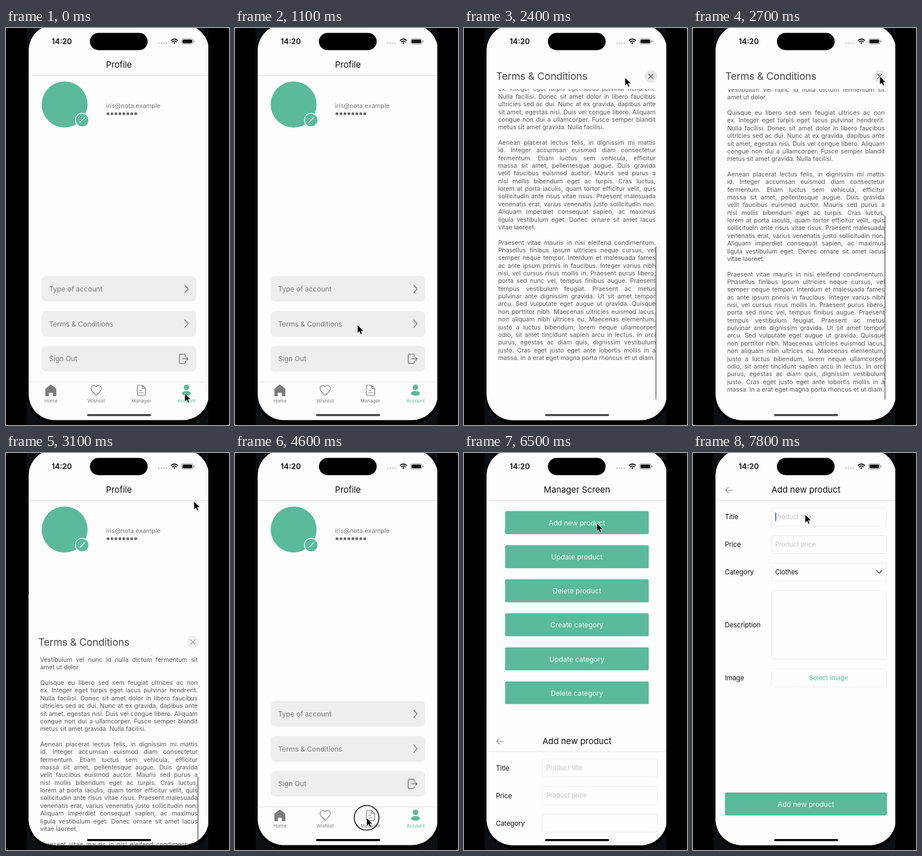
These frames come from a looping animation (388x690 px, 8000 ms). An HTML page:

```html
<!DOCTYPE html>
<html lang="en">
<head>
<meta charset="utf-8">
<title>Account screens</title>
<style>
html, body { margin: 0; width: 100%; height: 100%; overflow: hidden; background: #000; }
#stage { position: absolute; width: 388px; height: 690px; overflow: hidden; font-family: Inter, Roboto, sans-serif; }
#screen, .layer, svg { position: absolute; left: 0; top: 0; width: 388px; height: 690px; }
#screen { clip-path: inset(-6px 35px 8.5px 39.5px round 45px); }
.layer { background: #fdfdfd; }
#view { position: absolute; left: 59.5px; top: 106px; width: 274px; height: 584px; overflow: hidden; }
#copy { font-size: 10.7px; line-height: 13.36px; color: #585858; white-space: nowrap; }
#copy div { height: 13.36px; text-align-last: justify; }
#copy .end { text-align-last: left; }
#bar { position: absolute; left: 333px; width: 2px; border-radius: 1px; background: #8a8a8a; }
#edge { position: absolute; left: 351.5px; top: 0; width: 37px; height: 690px; background: #000; }
</style>
</head>
<body>
<div id="stage">
  <svg id="frame"></svg>
  <div id="screen">
    <div class="layer" id="profile"></div>
    <div class="layer" id="manager"></div>
    <div class="layer" id="terms">
      <svg id="termsHead"></svg>
      <div id="view"><div id="copy"></div></div>
      <div id="bar"></div>
    </div>
    <div class="layer" id="form"></div>
    <svg id="status"></svg>
  </div>
  <div id="edge"></div>
  <svg id="pointer"></svg>
</div>
<script>
const GREEN = '#5bb99c', GRAY = '#7b7b7b';
const $ = id => document.getElementById(id);

// drawing helpers; y is the middle of the capitals
const text = (x, y, size, color, str, anchor = 'start', more = '') =>
  `<text x="${x}" y="${y + size * 0.36}" font-size="${size}" fill="${color}" text-anchor="${anchor}" ${more}>${str}</text>`;
const rect = (x, y, w, h, r, fill, more = '') =>
  `<rect x="${x}" y="${y}" width="${w}" height="${h}" rx="${r}" fill="${fill}" ${more}/>`;
const circle = (x, y, r, fill, more = '') => `<circle cx="${x}" cy="${y}" r="${r}" fill="${fill}" ${more}/>`;
const stroke = (d, color, width = 1.2) =>
  `<path d="${d}" fill="none" stroke="${color}" stroke-width="${width}" stroke-linecap="round" stroke-linejoin="round"/>`;
const rule = y => rect(39, y, 313, 1, 0, '#e2e2e2');
const svg = body => `<svg>${body}</svg>`;
const navTitle = str => text(196.5, 64, 14.8, '#111', str, 'middle') + rule(82);
const button = (x, y, w, str) =>
  rect(x, y, w, 40, 2.5, GREEN) + text(x + w / 2, y + 20.5, 12.1, '#f0faf6', str, 'middle');

function tabs(active) {
  const color = i => i === active ? GREEN : GRAY;
  const labels = ['Home', 'Wishlist', 'Manager', 'Account'];
  return rule(614.5) +
    `<path d="M78 619.5l9.5 7.5v11.5q0 1.5-1.5 1.5h-4.5v-6h-7v6h-4.5q-1.5 0-1.5-1.5v-11.5z" fill="${color(0)}"/>` +
    stroke('M157 638.5C153 635 148 631 148 626.5C148 620.5 155 620 157 624C159 620 166 620.5 166 626.5C166 631 161 635 157 638.5z', color(1)) +
    stroke('M231 621h6.5l5.5 5.5v9.5q0 2.5-2.5 2.5h-9.5q-2.5 0-2.5-2.5v-12.5q0-2.5 2.5-2.5zM237.5 621v5.5h5.5M232.5 630h4M232.5 634h6.5', color(2)) +
    circle(314, 624.5, 4.8, color(3)) +
    `<ellipse cx="314" cy="635" rx="8" ry="4" fill="${color(3)}"/>` +
    labels.map((s, i) => text(78.3 + i * 78.6, 648, 8.1, color(i), s, 'middle')).join('');
}

const row = (y, str, icon) => rect(62, y, 269, 44.5, 8, '#eeeeee') + text(75, y + 22.5, 12.1, GRAY, str) + stroke(icon, GRAY, 1.4);
const chevron = y => `M311 ${y - 6.5}l6 6.5l-6 6.5`;

$('frame').innerHTML = rect(36, 0, 316, 690, 0, '#0c0f13') + rect(37, -9, 320, 697, 49, '#000');

$('profile').innerHTML = svg(
  navTitle('Profile') +
  circle(102, 133, 40, GREEN) +
  circle(132.5, 160, 11.8, GREEN, 'stroke="#fff" stroke-width="1.5"') +
  stroke('M128.5 164l8-8', '#fff', 1.5) +
  text(174, 135, 10.9, GRAY, 'iris@nota.example') +
  Array.from({length: 8}, (_, i) => circle(177.5 + i * 6.9, 149, 2.5, '#6c6c6c')).join('') +
  row(431, 'Type of account', chevron(453.5)) +
  row(492, 'Terms &amp; Conditions', chevron(514)) +
  row(552.5, 'Sign Out', 'M312 571v-2.5q0-1.5-1.5-1.5h-7.5q-1.5 0-1.5 1.5v13q0 1.5 1.5 1.5h7.5q1.5 0 1.5-1.5v-2.5M307 575h10M314 572l3 3l-3 3') +
  tabs(3));

$('manager').innerHTML = svg(
  navTitle('Manager Screen') +
  ['Add new product', 'Update product', 'Delete product', 'Create category', 'Update category', 'Delete category']
    .map((s, i) => button(71.5, 101 + i * 59.2, 250, s)).join('') +
  tabs(2));

$('termsHead').innerHTML =
  text(56, 84, 17.6, '#484848', 'Terms &amp; Conditions', 'start', 'letter-spacing="-.2"') +
  `<g id="close">${circle(325, 84, 11, '#e9e9e9')}${stroke('M321 80l8 8M329 80l-8 8', '#666', 1.5)}</g>`;

const field = (y, h) => rect(136.5, y + 0.5, 200, h, 3, '#fefefe', 'stroke="#ececec"');
const label = (y, str) => text(55.5, y, 11.5, '#111', str);
$('form').innerHTML = svg(
  navTitle('Add new product') +
  stroke('M69 64.5h-12.5M61.5 59.5l-5 5l5 5', '#888', 1.1) +
  label(111, 'Title') + field(95, 31) + text(143, 111, 11.1, '#c2c2c2', 'Product title') +
  label(159, 'Price') + field(143, 31) + text(143, 159, 11.1, '#c2c2c2', 'Product price') +
  label(207, 'Category') + field(191, 31) +
  `<g id="choice">${text(143, 207, 11.1, '#111', 'Clothes')}${stroke('M319.5 204.5l4.5 4.5l4.5-4.5', '#222', 1.3)}</g>` +
  label(299, 'Description') + field(239, 119) +
  label(391, 'Image') + field(375, 31) + text(236, 391, 11.1, GREEN, 'Select image', 'middle') +
  button(55.5, 590, 282, 'Add new product') +
  rect(143, 103, 1.6, 15.5, 0.8, '#3f66c8', 'id="caret"'));

$('status').innerHTML =
  `<g id="navRule">${rule(82)}</g>` +
  rect(146, 8.5, 100.5, 30, 15, '#000') +
  text(97, 23, 13, '#111', '14:20', 'middle', 'font-weight="600"') +
  [266, 270.3, 274.6, 278.9].map(x => circle(x, 26.5, 1.3, '#c4c4c4')).join('') +
  stroke('M287.5 21.5q5.5-4.5 11 0M289.7 24q3.3-2.7 6.6 0', '#111', 1.8) + circle(293, 26.3, 1.4, '#111') +
  rect(305.5, 18.5, 20, 9.5, 3, 'none', 'stroke="#999"') + rect(307, 20, 17, 6.5, 1.8, '#111') + rect(326.5, 21.5, 1.5, 3.5, 0.7, '#999') +
  rect(141, 671, 111.5, 3.6, 1.8, '#000', 'id="home"');

$('pointer').innerHTML =
  '<g id="mouse"><circle id="ring" r="21.5" fill="none" stroke="#111" stroke-width="1.6"/>' +
  '<path d="M0 0V14.5L3.4 11.4L5.7 16.6L8.3 15.5L6 10.4H10.6Z" fill="#000" stroke="#fff" stroke-width=".8"/></g>';

const copy = `Lorem ipsum dolor sit amet, consectetur adipiscing
elit. Proin viverra, nisi eu dignissim molestie, mi
nisl eleifend massa, cursus lacinia mi arcu a
sapien. Sed quis felis vulputate, rhoncus odio sit
amet, malesuada augue. Pellentesque habitant morbi
tristique senectus et netus et malesuada fames ac
turpis egestas. Donec nibh massa, finibus sed risus
porta, lacinia efficitur tortor. Aenean molestie tortor
in massa rutrum, suscipit viverra mauris eleifend.
Maecenas eu neque non massa imperdiet congue et
eu dui. Nulla viverra, massa ac volutpat auctor, erat mi
malesuada sapien, vel tristique felis risus sed metus.
In ac accumsan arcu.

Vivamus eget posuere magna, a fermentum ante.
Sed in purus at risus molestie dapibus et vel dolor.
Proin lobortis risus et neque viverra, ut mattis tortor
tempor. Integer et ultricies nunc. Fusce sit amet
lectus vehicula, convallis diam quis, sagittis velit.
Praesent rhoncus, urna a congue hendrerit, massa
ante malesuada quam, commodo dapibus lacus diam
et libero. Curabitur massa tortor, lobortis sed massa
id, porta lacinia ante. Praesent imperdiet, nibh id
volutpat tincidunt, lectus dui mattis nisl, nec porta
metus tortor nec ex. In hac habitasse platea dictumst.
Vestibulum vel nunc id nulla dictum fermentum sit
amet ut dolor.

Quisque eu libero sed sem feugiat ultrices ac non
ex. Integer eget turpis eget lacus pulvinar hendrerit.
Nulla facilisi. Donec sit amet dolor in libero faucibus
ultricies sed ac dui. Nunc at ex gravida, dapibus ante
sit amet, egestas nisi. Duis vel congue libero. Aliquam
congue non dui a ullamcorper. Fusce semper blandit
metus sit amet gravida. Nulla facilisi.

Aenean placerat lectus felis, in dignissim mi mattis
id. Integer accumsan euismod diam consectetur
fermentum. Etiam luctus sem vehicula, efficitur
massa sit amet, pellentesque augue. Duis gravida
velit faucibus euismod auctor. Mauris sed purus a
nisl mollis bibendum eget ac turpis. Cras luctus,
lorem at porta iaculis, quam tortor efficitur velit, quis
sollicitudin ante risus vitae risus. Praesent malesuada
venenatis erat, varius venenatis justo sollicitudin non.
Aliquam imperdiet consequat sapien, ac maximus
ligula vestibulum eget. Donec ornare sit amet lacus
vitae laoreet.

Praesent vitae mauris in nisi eleifend condimentum.
Phasellus finibus ipsum ultricies neque cursus, vel
semper neque tempor. Interdum et malesuada fames
ac ante ipsum primis in faucibus. Integer varius nibh
nisi, vel cursus risus mollis in. Praesent purus libero,
porta sed nunc vel, tempus finibus augue. Praesent
tempus vestibulum feugiat. Praesent ac metus
pulvinar ante dignissim gravida. Ut sit amet tempor
arcu. Sed vulputate eget augue ut gravida. Quisque
non porttitor nibh. Maecenas ultricies euismod lacus,
non aliquam nibh ultrices eu. Maecenas elementum,
justo a luctus bibendum, lorem neque ullamcorper
odio, sit amet tincidunt sapien arcu in lectus. In orci
purus, egestas ac diam quis, dignissim vestibulum
justo. Cras eget justo eget ante lobortis mollis in a
massa. In a erat eget magna porta rhoncus et ut diam.`.split('\n');
$('copy').innerHTML = copy.map((s, i) => `<div${copy[i + 1] ? '' : ' class="end"'}>${s}</div>`).join('');

// time, x, y of the pointer tip
const path = [
  [150, 311, 635], [950, 213, 516], [1300, 213, 516], [1600, 213, 520], [1850, 213, 520],
  [2400, 280, 86], [2700, 325, 84], [2980, 325, 84], [3100, 327, 84], [3200, 327, 84],
  [4450, 229, 634], [4800, 229, 634], [5600, 231, 122], [7430, 231, 122], [7720, 195, 107]
];
const clicks = [[1130, 1330], [2730, 2950], [4530, 4750], [6180, 6390]];
const DROP = 690, MAX_SCROLL = 340;

// share of the way left for a critically damped spring started at t = 0
const left = ms => ms <= 0 ? 1 : (1 + 0.012 * ms) * Math.exp(-0.012 * ms);

function pointerAt(t) {
  const i = path.findIndex(p => p[0] > t);
  if (i < 0) return path[path.length - 1].slice(1);
  if (i === 0) return path[0].slice(1);
  const [a, b] = [path[i - 1], path[i]];
  const u = (t - a[0]) / (b[0] - a[0]), e = u * u * (3 - 2 * u);
  return [1, 2].map(k => a[k] + (b[k] - a[k]) * e);
}

// the copy follows the drag, stretches past its end, then springs back
function scrollAt(t) {
  if (t < 1850) return 0;
  const drag = 520 - pointerAt(Math.min(t, 2400))[1];
  const over = Math.max(0, drag - MAX_SCROLL) * 0.66;
  return Math.min(drag, MAX_SCROLL) + over * left(t - 2400);
}

const show = (id, on) => $(id).style.visibility = on ? 'visible' : 'hidden';
const drop = (id, y) => $(id).style.transform = `translateY(${y}px)`;

function draw() {
  const t = performance.now() % 8000;
  const [x, y] = pointerAt(t), scroll = scrollAt(t);

  drop('terms', DROP * (t < 2997 ? left(t - 1322) : 1 - left(t - 2997)));
  drop('copy', 8.3 - scroll);
  const over = Math.max(0, scroll - MAX_SCROLL);
  const top = 107 + (scroll - over) * 0.62 + over;
  $('bar').style.top = top + 'px';
  $('bar').style.height = 328 - over + 'px';
  $('close').style.opacity = t < 2950 ? 1 : 0.6;
  show('bar', t > 1850 && t < 4000);
  show('navRule', t < 1800);

  show('manager', t >= 4680);
  drop('form', DROP * left(t - 6394));
  show('choice', t >= 6580);
  show('caret', t >= 7740);

  $('home').setAttribute('fill', t < 2900 ? '#444' : '#000');
  $('mouse').setAttribute('transform', `translate(${x} ${y})`);
  show('ring', clicks.some(([a, b]) => t >= a && t < b));
  requestAnimationFrame(draw);
}
draw();
</script>
</body>
</html>
```
